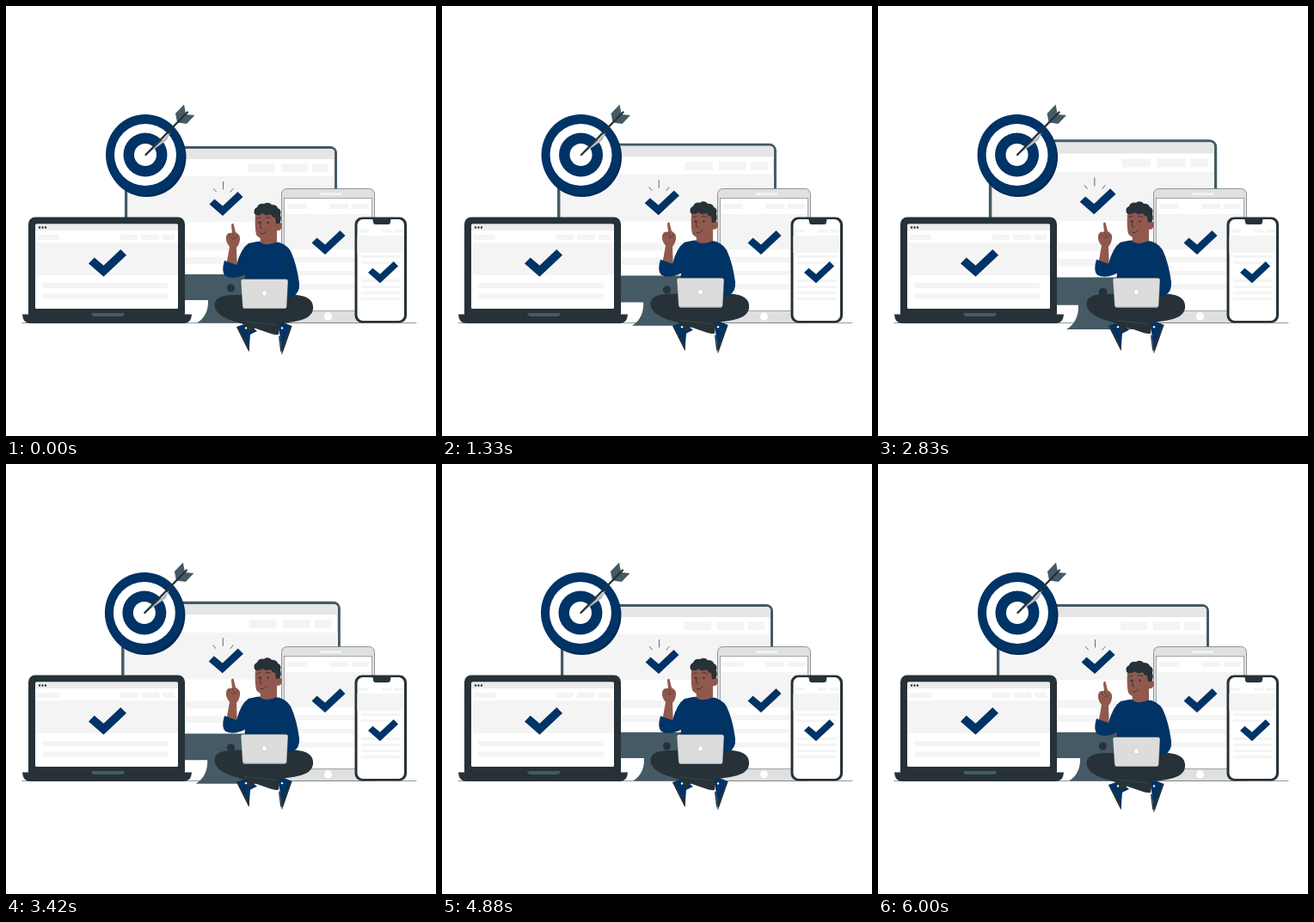
Recreate the animation shown at these times as an HTML page. Size 500x500 px, loop 6040 ms.

```html
<!DOCTYPE html>
<html lang="en">
<head>
<meta charset="utf-8">
<title>Responsive devices</title>
<style>
html, body { margin: 0; width: 100%; height: 100%; overflow: hidden; background: #fff; }
svg { display: block; width: 100vw; height: 100vh; }
.navy { fill: #036; }
.dark { fill: #263238; }
.slate { fill: #455a64; }
.skin { fill: #91594d; }
.white { fill: #fff; }
.bar { fill: #e6e6e6; }
.pale { fill: #f4f4f4; }
.line { fill: none; stroke: #263238; stroke-linecap: round; stroke-linejoin: round; }
</style>
</head>
<body>
<svg viewBox="0 0 500 500">
<defs><path id="check" class="navy" d="M0 14.5 6 8.5 15.5 16.5 33 0 39 6 15.5 28z"/></defs>

<path class="line" d="M19 368.5H477" stroke-width=".5"/>

<g id="monitor">
  <path class="slate" d="M235 341Q236 360 222 368.500H302Q288 360 288 341z"/>
  <rect class="slate" x="138" y="163" width="247" height="179" rx="8"/>
  <path class="white" d="M141.500 312V171Q141.500 166 147 166H377Q382 166 382 171V312z"/>
  <path class="bar" d="M141.500 178V171Q141.500 166 147 166H377Q382 166 382 171V178z"/>
  <path class="pale" d="M282 183.500h31v9.500h-31zM320 183.500h31v9.500h-31zM356 183.500h19v9.500h-19zM141.500 198H382V251H141.500zM157 275H366v9H157zM157 292H366v8H157z"/>
  <circle class="dark" cx="261.500" cy="328" r="4.500"/>
  <use href="#check" x="236.500" y="216"/>
  <path class="line" d="M252.500 204.500V213M241.500 212.500 244.500 216M264 212.500 261 216" stroke-width=".7"/>
</g>

<g id="target">
  <ellipse cx="163.500" cy="175.500" rx="46" ry="46.500" fill="#00284f"/>
  <ellipse class="navy" cx="162" cy="173" rx="46" ry="47"/>
  <circle class="white" cx="162" cy="173" r="36"/>
  <circle class="navy" cx="162" cy="173" r="25.500"/>
  <circle class="white" cx="162" cy="173" r="13"/>
  <path d="M163 173 191 147 187 156z" fill="#b4bcc2"/>
  <path class="slate" d="M197 125 207 114.500 209 125 199 135zM199 135.500 209 126 219.500 127 210 137z"/>
  <path class="line" d="M162.500 173 211 123.500" stroke-width="2.400"/>
</g>

<g>
  <rect class="dark" x="26" y="245.500" width="182" height="120" rx="8"/>
  <rect class="white" x="34" y="253.500" width="166" height="98.500" rx="1.500"/>
  <path class="bar" d="M34 261V255Q34 253.500 36 253.500H198Q200 253.500 200 255V261z" fill-opacity=".75"/>
  <path class="line" d="M39 257.500h0M42.500 257.500h0M46 257.500h0" stroke-width="2.400"/>
  <path class="pale" d="M37 266h25v6H37zM133 266h20v6h-20zM157 266h21v6h-21zM182 266h14v6h-14zM34 275H200V313H34zM42.500 322H188v6H42.500zM42.500 334.500H188v6H42.500z"/>
  <use href="#check" transform="translate(96 283) scale(1.130)"/>
  <path class="dark" d="M19 358.500H216Q215.500 369 207 369H28Q19.500 369 19 358.500z"/>
  <path class="slate" d="M99 357H138Q137 361 134 361H103Q100 361 99 357z"/>
</g>

<g>
  <rect x="320.500" y="212.500" width="108" height="156" rx="6" fill="#e0e0e0" stroke="#666f74" stroke-width=".7"/>
  <path d="M366 218.500H389" stroke="#f5f5f5" stroke-width="2.500" stroke-linecap="round"/>
  <rect class="white" x="323.500" y="223.500" width="102" height="131" stroke="#7d858a" stroke-width=".7"/>
  <path class="pale" d="M327 230h23v6h-23zM376 230h22v6h-22zM402 230h20v6h-20zM324 242H425V283H324zM329 292H420v6H329zM329 308H420v5H329zM329 323.500H420v6H329z"/>
  <circle class="white" cx="374.500" cy="361" r="4.500"/>
  <use href="#check" x="355.500" y="261"/>
</g>

<g>
  <rect class="dark" x="405.500" y="245.500" width="60.500" height="123" rx="8.500"/>
  <rect class="white" x="408.500" y="248" width="54.500" height="118" rx="6.500"/>
  <path class="dark" d="M425.500 247H448Q447 249 447 251 447 254 444 254H430Q427 254 427 251 427 249 425.500 247z"/>
  <path class="pale" d="M410 260h12v3.500h-12zM437 260h11v3.500h-11zM451 260h11v3.500h-11zM408.500 267H463V287H408.500zM413 290h46v3h-46zM413 297h46v3h-46zM413 318h46v3h-46zM413 325h46v3h-46zM413 332h46v3h-46zM413 339h46v3h-46z"/>
  <use href="#check" transform="translate(421 297) scale(.9)"/>
</g>

<g id="man">
  <path class="navy" d="M268 373 280 369 292 378 284 382 282.500 402z"/>
  <path class="dark" d="M268 373 270 373 282.800 396 282.500 402 280 397z"/>
  <path class="navy" d="M317 371 320 367 332.500 372 321 405z"/>
  <path class="dark" d="M332.500 372 330.500 372 320 399 320 405 322 402zM317 384 318.500 384 321 405 319 401z"/>
  <path class="dark" d="M262 336Q242 337 242.500 348 243 361 270 368L308 381Q314 383 317 382L319 369Q344 367 352 361 358 356 357 349 356 338 338 336z"/>
  <path class="dark" d="M319 366 290 374Q284 379 282 380L276 370 300 360z"/>
  <path class="line" d="M277 367 314 371" style="stroke:#455a64" stroke-width=".5"/>
  <circle class="white" cx="279" cy="374.500" r="1.200"/>
  <circle class="white" cx="321" cy="374.500" r="1.200"/>

  <path class="skin" d="M256 302 260 280Q255 274 256 268 258 263 263 264L262 255Q262 252.500 264.500 253L267 263Q273 266 272 272 271 278 268 281L269 308z"/>
  <path class="line" d="M258 265 262 269M263 264 266 270M269 267Q267 272 263 271" stroke-width=".5"/>
  <path class="navy" d="M282 276Q296 272 312 274 325 275 331 285 338 300 341 322 342 334 333 338L324 339 276 330 278 312Q264 319 255 314 250 309 254 296L268 301Q273 282 282 276z"/>
  <path class="line" d="M327 282Q328 300 323 318M278 312 280 302" stroke-width=".5"/>
  <path class="skin" d="M295 261H315V274Q304 280 296 275z"/>
  <path class="skin" d="M290 241Q294 235 314 239L316 253Q321 250 321 256 320 262 315 261 312 270 304 271 295 272 291 266 289 258 290 241z"/>
  <path class="dark" d="M289 242Q287 236 292 234 294 229 300 230 305 227 309 231 315 231 316 235 321 237 319 243 321 248 318 253L314 253 313 246Q309 246 308 242 302 245 298 241 295 245 289 242z"/>
  <path class="line" d="M292 247 296 246M302 246Q305 244.500 308 247M296.500 251 295.500 258 298 258.500M296 265Q300 266 303 262" stroke-width=".8"/>
  <path class="line" d="M294.500 251.500v.8M304.500 251.500v.8" stroke-width="1.800"/>

  <path d="M275 317.500H325Q328 317.500 328 320L326.500 349Q326.500 352 323.500 352H278Q275 352 275 349L273 320Q273 317.500 275 317.500z" fill="#dcdcdc" stroke="#263238" stroke-width=".4"/>
  <path class="line" d="M277 351.500H324" style="stroke:#a6a6a6" stroke-width="1"/>
  <circle class="white" cx="300.500" cy="334" r="3.200" stroke="#aaa" stroke-width=".5"/>
</g>
</svg>
<script>
const LOOP = 6040, FLOAT = 1500;
const beats = [[0, 1], [620, 1.08], [1800, 1], [2460, 1], [2860, 1.08], [3780, 1], [LOOP, 1]];
const move = (id, value) => document.getElementById(id).setAttribute('transform', value);

function beatScale(t) {
  const i = beats.findIndex(b => b[0] > t);
  const [t0, a] = beats[i - 1], [t1, b] = beats[i];
  return a + (b - a) * (t - t0) / (t1 - t0);
}

function draw(now) {
  const t = now % LOOP;
  const phase = t < 4 * FLOAT ? t % FLOAT / FLOAT : 0;
  const lift = 1 - Math.abs(1 - 2 * phase);
  move('man', `translate(0 ${-6 * lift})`);
  move('target', `translate(${-2 * lift} 0)`);
  move('monitor', `translate(261.5 266) scale(${beatScale(t)}) translate(-261.5 -266)`);
}

const start = performance.now();
function tick() {
  draw(performance.now() - start);
  requestAnimationFrame(tick);
}
tick();
</script>
</body>
</html>
```
